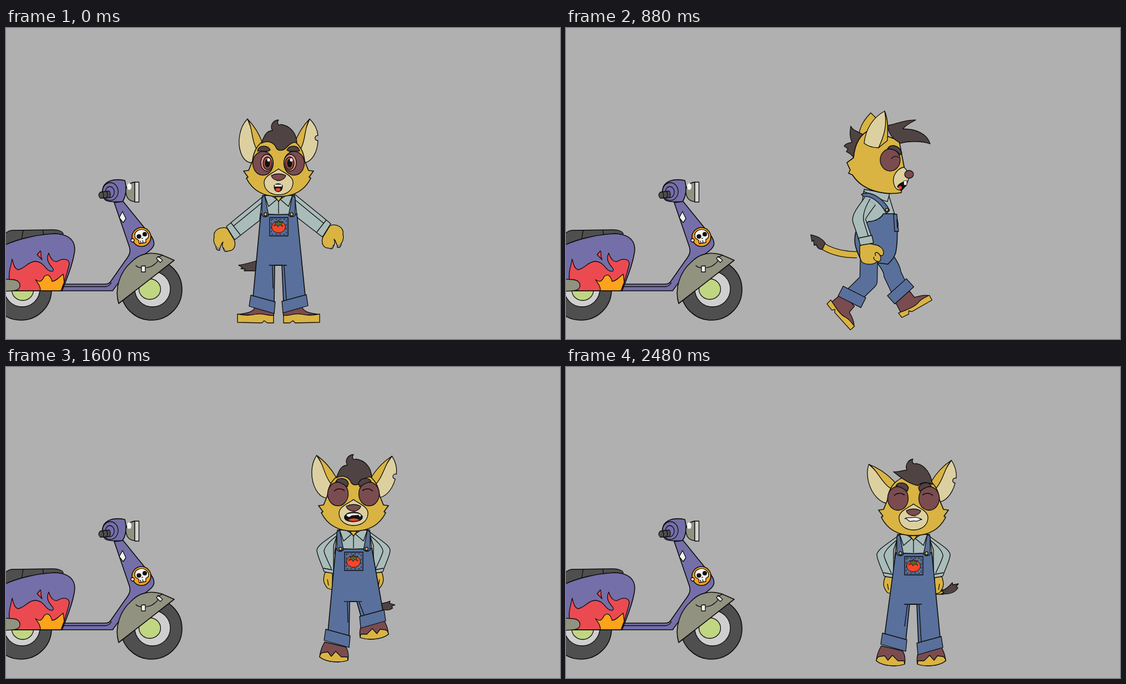
An HTML page for the animation above (2.6 s loop, 998 by 561 pixels).

```html
<!DOCTYPE html>
<html lang="en">
<head>
<meta charset="utf-8">
<title>Stomping off</title>
<style>
html, body { margin: 0; width: 100%; height: 100%; overflow: hidden; background: #b0b0b0; }
svg { display: block; width: 100%; height: 100%; }
</style>
</head>
<body>
<svg viewBox="0 0 998 561" stroke="#0d0d0d" stroke-width="1.3" stroke-linejoin="round">
  <g id="scooter"></g>
  <g id="hero"></g>
</svg>
<script>
const GOLD = '#d9b443', TAN = '#ddd0a0', HAIR = '#4f4343', BROWN = '#7a4c50', DENIM = '#58709b',
  SHIRT = '#a9bcba', RED = '#f5462a', RUBBER = '#4f4f4f', PURPLE = '#746fa8', OLIVE = '#929280', WHITE = '#f4f4f4', BLACK = '#111';

const P = (d, fill = 'none', w = 1.3) => `<path d="${d}" fill="${fill}" stroke-width="${w}"/>`;
const E = (x, y, rx, ry, fill, w = 1.3) => `<ellipse cx="${x}" cy="${y}" rx="${rx}" ry="${ry}" fill="${fill}" stroke-width="${w}"/>`;
const G = (transform, ...parts) => `<g transform="${transform}">${parts.join('')}</g>`;
const at = (x, y, ...parts) => G(`translate(${x} ${y})`, ...parts);
const turn = (a, x, y, ...parts) => G(`rotate(${a} ${x} ${y})`, ...parts);
const flip = (...parts) => G('scale(-1 1)', ...parts);
const both = art => art + flip(art);
const limb = (d, w, color) => P(d, 'none', w + 2.6) + `<path d="${d}" fill="none" stroke="${color}" stroke-width="${w}"/>`;

function scooter() {
  const wheel = (x, hubX, hubY) => E(x, 472, 55, 55, RUBBER, 1.6) + E(x + 2, 471, 32, 32, '#cfcfcf') + E(hubX, hubY, 19.5, 18.5, '#c0d683');
  return [
    wheel(27, 30, 473), wheel(262, 259, 471),
    P('M-3 373Q2 366 10 365L84 364C95 364 102 367 103 371L100 380L-3 400Z', RUBBER),
    P('M31 365L28 382M66 364L68 374'),
    P('M195 315L211 313L262 376C270 388 267 395 258 402L240 416C225 430 208 452 192 474H95V462H178C183 462 186 461 188 458L216 418C223 409 225 403 222 394Z', PURPLE, 1.6),
    P('M100 466.5H180C185 466 188 463 190 459'),
    P('M-3 392C22 380 60 372 88 371C116 372 127 386 123 407C118 435 108 455 101 474H-3Z', PURPLE, 1.6),
    P('M6 452C4 440 9 430 11 417C14 426 14 432 21 436C33 435 40 421 52 421C64 421 69 430 74 435C81 441 88 440 84 433C78 426 71 418 77 406C80 416 87 426 96 419C104 416 114 416 114 426C111 440 106 452 101 474H14Z', '#ec4a51'),
    P('M62 402L56 409L65 418C61 411 65 409 62 402Z', '#ec4a51'),
    P('M62 474C62 464 57 460 53 454C61 459 64 458 69 448C75 443 80 446 83 457C90 457 95 450 103 444C104 448 104 455 105 458L99 474Z', '#fda31c'),
    P('M-3 453L14 454C29 456 29 473 14 474L-3 475Z', OLIVE),
    P('M203 497C195 470 205 440 226 422C240 407 260 403 280 409L303 419Z', OLIVE, 1.6),
    P('M234 428C236 434 259 436 270 424C278 420 268 414 282 410'),
    P('M244 429.5L251 429L251 440L244 440Z', WHITE), P('M274 412L282 419L278 423L271 416Z', WHITE),
    P('M204 342L210 331L216 344L211 351Z', WHITE),
    E(244, 377, 17, 17, '#fda31c', 1.6), E(228, 383, 3, 3, WHITE),
    P('M233 379C228 366 243 360 252 366C260 372 257 380 252 381L252 387L240 389L239 383Z', WHITE),
    E(239.5, 376, 4.2, 4, BLACK, 0), E(250, 372, 4, 4, BLACK, 0), P('M244 380L247 379M242 384L243 388M246 383L247 387'),
    P('M176 285C184 273 198 272 214 275C218 289 216 304 210 313C200 314 188 314 180 311C172 305 172 294 176 285Z', PURPLE, 1.6),
    E(188, 295, 14, 16, PURPLE), E(187, 296, 8, 10, PURPLE),
    P('M170 296L186 294Q190 300 186 306L170 307Q164 301 170 296Z', RUBBER), P('M174 296Q178 301 174 307M181 295Q185 300 181 306'),
    P('M216 291C218 282 224 279 232 278V313C222 313 215 306 216 291Z', OLIVE),
    E(222, 286, 4, 6, WHITE, 0), P('M232 278H239.5V314H232Z', '#d4d4d4')
  ].join('');
}

const FACES = {
  calm: P('M-8 284Q-1 278 7 284Q7 295 -1 295Q-8 295 -8 284Z', BLACK) + P('M-7 282.5H6V286H-7Z', WHITE, 0) + E(-1, 291.5, 4.5, 2.7, RED, 0),
  shout: P('M-16 284C-12 277 -5 278 0 277C6 276 13 279 16 284C17 291 8 294 0 294C-8 294 -18 292 -16 284Z', BLACK) +
    P('M-13 281C-6 278 8 277 14 282L12 286L9 282L-3 283L-8 286L-12 284Z', WHITE, .5) + P('M-10 291Q0 285 11 291Q0 295 -10 291Z', RED, 0),
  grit: P('M-14 280C-8 277 -2 280 1 278C6 277 11 280 15 282C10 282 8 286 4 285C-2 283 -6 288 -9 284Z', WHITE) + P('M-16 281L-13 279')
};

function frontHead({ face, ears }) {
  const calm = face === 'calm';
  const strip = P('M-56 164C-46 180 -50 199 -40 218L-26 226L-28 210C-35 190 -46 174 -56 164Z', GOLD);
  const leftEar = P('M-56 164C-70 178 -75 205 -68 225C-64 236 -57 243 -48 243L-34 238L-36 215Z', TAN) + strip;
  const rightEar = P('M56 164C65 173 70 182 71 194C65 193 63 203 71 203C70 225 60 240 48 243L34 238L36 215Z', TAN) + flip(strip);
  const eye = E(-21, 243, 11, 15, '#d89e90') + E(-20, 244, 8, 11.5, '#95493c') + E(-20, 244, 4.6, 7.5, BLACK, 0);
  return [
    turn(ears[0], -42, 225, leftEar), turn(ears[1], 42, 225, rightEar),
    P('M0 196C-24 196 -44 210 -47 240L-54 257L-63 258L-55 269L-58 271C-46 295 -24 304 0 304C24 304 46 295 58 271L55 269L63 258L54 257L47 240C44 210 24 196 0 196Z', GOLD, 1.6),
    P(face === 'grit' ? 'M-36 189C-28 190 -20 186 -12 186C-16 175 -8 167 -1 166C-4 172 0 176 4 174C22 176 32 195 34 212C24 206 14 208 8 214C-4 212 -18 204 -36 189Z'
      : 'M-31 208C-26 196 -24 186 -11 185C-17 174 -8 166 0 166C-4 172 0 176 4 174C20 176 32 188 33 207C25 204 18 212 14 216C8 222 0 222 -4 217C-8 206 -20 202 -31 208Z', HAIR),
    at(0, calm ? 0 : -7,
      both(E(-28, 244, 18.5, 21.5, BROWN) + (calm ? eye : P('M-35 239Q-26 231 -16 238', 'none', 1.6)) +
        P(calm ? 'M-38 222C-36 211 -20 210 -15 220C-20 225 -28 221 -38 222Z' : 'M-32 222C-28 213 -13 214 -9 225L-11 231C-18 227 -24 222 -32 222Z', HAIR)),
      calm ? E(-18, 238, 2.5, 3, WHITE, 0) + E(23, 238, 2.5, 3, WHITE, 0) : '',
      P('M0 254C8 261 27 266 26 280C25 294 13 301 0 301C-13 301 -25 294 -26 280C-27 266 -8 261 0 254Z', TAN),
      P('M-13 266Q0 260 13 266Q12 272 3 275H-3Q-12 272 -13 266Z', BROWN), FACES[face])
  ].join('');
}

function front(p) {
  const calm = p.face === 'calm', b = p.body, h = p.head, crotch = 428 + b * .6, [[lx, ly], [rx, ry]] = p.feet;
  const spread = P('M-28 304C-50 322 -75 342 -94 358L-79 382L-30 344Z', SHIRT) + P('M-86 351L-69 373M-31 316L-81 357') +
    P('M-93 361C-105 358 -118 364 -116 377C-119 387 -112 398 -106 398C-103 392 -103 388 -100 386C-104 396 -96 405 -90 402C-80 402 -76 392 -80 382Z', GOLD) +
    P('M-113 393Q-113 402 -106 401L-106 397M-99 396Q-99 405 -92 403', '#8d8d8d');
  const akimbo = P(`M-27 ${304 + h - b}C-45 318 -64 328 -66 338C-66 348 -57 364 -53 377L-36 382V330Z`, SHIRT) +
    P('M-30 312C-42 322 -53 332 -53 341C-50 352 -44 362 -40 372M-54 371L-38 374') +
    P('M-51 378C-57 395 -52 400 -47 407L-38 410V380Z', GOLD) + P('M-47 391L-45 402');
  const cuff = P('M-56 480L-12 492L-14 513L-59 500Z', DENIM);
  const shoe = P('M-58 503L-20 512C-14 520 -15 530 -16 536C-30 541 -55 540 -67 530C-66 518 -62 510 -58 503Z', BROWN) +
    P('M-67 530C-66 524 -64 522 -60 522L-52 521L-46 529L-38 520L-28 530L-17 530L-16 536C-30 541 -55 540 -67 530Z', GOLD);
  const boot = P('M-42 503C-46 514 -60 514 -73 517L-9 519L-8 511Z', BROWN) +
    P('M-74 516C-60 519 -50 519 -40 516C-25 514 -15 521 -9 518V532H-20L-26 528L-30 532L-74 531Z', GOLD);
  const tail = calm ? P('M-40 420C-50 423 -60 426 -72 428L-65 432L-68 434L-60 435L-62 438L-40 438Z', HAIR)
    : at(-p.tail / 3, p.tail, turn(p.tail, 62, 402, P('M38 400L54 402V410L38 410Z', GOLD) +
      P('M50 404C58 402 64 396 70 389L71 393L81 391L77 396L80 398C76 406 66 411 50 409L55 407Z', HAIR)));
  return at(p.x, 0,
    calm ? boot + flip(boot) : '', tail,
    at(0, b, calm ? spread + at(0, -5, flip(spread)) : both(akimbo)), P(`M-29 ${302 + h}H29L34 ${345 + b}H-34Z`, SHIRT),
    calm ? '' : at(lx, ly, shoe) + at(rx - 9, ry, flip(shoe)),
    P(`M-32 ${b + 335}L${lx - 52} ${ly + 484}L${lx - 14} ${ly + 495}L-7 ${crotch}H6L${rx + 9} ${ry + 500}L${rx + 48} ${ry + 488}L33 ${b + 335}Q0 ${b + 338} -32 ${b + 335}Z`, DENIM, 1.6),
    P(`M-17 ${crotch}H15M-11 ${crotch + 1}L${lx - 16} ${ly + 468}M10 ${crotch + 1}L${rx + 14} ${ry + 495}`),
    at(lx, ly, cuff), at(rx - 6, ry + 6, flip(cuff)),
    P(`M0 ${309 + h}V${335 + b}`),
    both(at(0, h, P('M-25 302L-18 322L-3 309L-14 302Z', SHIRT)) +
      P(`M-30 ${306 + h}L-25 ${302 + h}L-18 ${338 + b}Q-24 ${343 + b} -30 ${338 + b}Z`, DENIM) + E(-23.5, 336 + b, 2.8, 2.8, '#c8ad62')),
    at(0, h, P('M-7 304H7L0 313Z', GOLD)),
    at(0, b,
      P('M-16 342H17V375H-16Z', DENIM), '<g stroke-dasharray="4 3">' + P('M-13 345H14V372H-13Z', 'none', .9) + '</g>',
      E(0, 359, 12.5, 10.5, RED, 1), P('M-7 349L-2 351L0 346L2 351L8 349L5 354L8 358L2 355L-1 359L-3 355L-9 357L-5 353Z', '#4b7030', .8)),
    at(0, h, frontHead(p)));
}

// hip, knee, ankle, foot angle, cuff angle
function leg([hx, hy, kx, ky, ax, ay, foot, cuff], left) {
  const reach = Math.hypot(kx - ax, ky - ay) / 10;
  const cx = ax + (kx - ax) / reach, cy = ay + (ky - ay) / reach;
  const shoe = P('M-17 -2H15L17 12C30 15 38 18 41 23V28H-18Z', BROWN) +
    P('M-22 22C-8 24 8 28 20 23C28 20 34 22 42 22V32H0L-4 28L-7 33L-21 32Z', GOLD);
  return G(`translate(${ax} ${ay}) rotate(${foot})`, left ? flip(shoe) : shoe) +
    limb(`M${hx} ${hy}Q${kx} ${ky - 12} ${kx} ${ky}L${cx} ${cy}`, 30, DENIM) +
    G(`translate(${cx} ${cy}) rotate(${cuff})`, P('M-23 -10H23V10H-23Z', DENIM));
}

const GRIP = P('M0 3C5 -3 20 -3 26 0C35 0 43 7 43 14C43 20 39 21 36 18C40 24 38 32 32 30C24 38 10 35 5 32C-2 25 1 14 0 3Z', GOLD) + P('M36 18C30 10 26 15 29 20M32 30C26 28 24 24 26 22');

const leanBack = p => at(p.x, p.y,
  limb('M463 430C452 447 432 455 415 457', 10, GOLD),
  P('M428 450L402 451L386 455L395 459L390 463L400 462L396 467C410 468 422 462 428 450Z', HAIR),
  leg(p.legs[0]),
  P('M452 314C480 302 500 305 510 322L517 340L460 368Z', SHIRT),
  P('M454 362C470 366 488 362 492 350C498 340 510 338 518 334C530 350 538 385 536 405C534 418 527 422 522 427L472 430C460 405 454 385 454 362Z', DENIM, 1.6),
  leg(p.legs[1]),
  P('M514 336L519 334L529 364L523 366Z', DENIM), P('M519 341C525 345 526 353 526 359Z', RED),
  limb('M468 326L434 356L450 392', 24, SHIRT), P('M462 318C445 335 434 348 433 355L441 388'),
  P('M470 310L497 304L495 319L478 316Z', SHIRT),
  P('M447 318C452 308 490 314 504 334L497 341C485 326 465 316 450 322Z', DENIM), E(499, 334, 2.8, 2.8, '#c8ad62'),
  at(441, 397, GRIP), P('M436 391L460 386L463 401L439 406Z', SHIRT),
  turn(p.tilt, 455, 308,
    P('M405 180L424 188L410 205Z', GOLD), P('M378 238L390 236L388 230L406 228V264L392 262L396 254L388 251L390 244Z', HAIR),
    P('M396 288L405 284C403 250 402 225 415 200C440 190 465 195 480 208L506 247L518 283C505 300 490 308 465 311C440 312 420 305 405 296L412 295Z', GOLD, 1.6),
    P('M415 188C425 182 437 190 443 184C444 179 441 175 437 175C452 170 459 179 462 189C466 178 476 174 485 183L493 194L485 193L480 208C465 211 452 209 440 212Z', HAIR),
    P('M392 183C386 205 392 232 415 244L433 242L438 233C430 212 412 193 392 183Z', TAN), P('M392 183C415 193 437 210 438 232L434 238C428 212 412 196 392 183Z', GOLD),
    E(472, 243, 17.5, 20.5, BROWN), P('M471 238Q477 231 483 236'), P('M458 226C461 214 476 212 485 221V227C474 222 466 222 458 226Z', HAIR),
    P('M506 247C492 252 487 264 493 275C498 284 507 286 518 283L512 274L518 260Z', TAN), P('M505 268C510 263 515 264 518 263L515 278L506 280Q502 274 505 268Z', BLACK),
    P('M512 265L517 263V271L511 272Z', WHITE, .6), E(508, 276, 4, 3, RED, 0), E(514, 253, 7.5, 6.5, BROWN)));

const leanForward = p => at(p.x, p.y,
  limb('M524 409C500 409 480 405 462 393', 10, GOLD),
  P('M467 388C460 378 452 376 441 373L443 385L446 383L447 392L451 391C453 398 458 400 462 399Z', HAIR),
  leg(p.legs[0]),
  P('M536 295L582 304L592 336L550 362L530 345Z', SHIRT),
  P('M545 349C558 349 568 342 572 335H592C598 350 598 385 594 405C590 418 585 420 580 426L532 420C520 395 518 385 522 368Z', DENIM, 1.6),
  leg(p.legs[1]),
  P('M590 336H596L599 367H592Z', DENIM), P('M596 345Q600 352 597 360Z', RED),
  limb('M548 312C535 330 527 340 528 347L540 382', 22, SHIRT), P('M548 308C536 328 534 342 537 351L545 377'),
  P('M537 291L583 299L579 313C565 310 550 300 537 295Z', SHIRT),
  P('M532 300C548 292 573 308 583 329L577 335C568 317 552 302 536 304Z', DENIM), E(578, 328, 2.8, 2.8, '#c8ad62'),
  at(529, 391, GRIP), P('M527 379L551 374L554 388L530 392Z', SHIRT),
  turn(p.tilt, 550, 295,
    P('M549 153L558 162L545 190L527 195C530 175 538 165 549 153Z', GOLD),
    P('M513 177C516 184 524 186 535 192L518 233L512 227L505 223L508 218L501 213C505 206 512 208 515 206C510 195 512 185 513 177Z', HAIR),
    P('M506 243L518 234C520 210 530 190 548 184L600 203L609 250L604 297C575 302 535 295 516 265L509 262L512 256Z', GOLD, 1.6),
    P('M579 176C592 174 612 165 630 166C618 172 610 178 607 182C630 182 650 190 656 209C640 203 615 204 603 208C592 202 582 195 579 176Z', HAIR),
    P('M574 150C555 160 540 180 537 208C545 214 555 216 563 216L579 200C580 180 580 165 574 150Z', TAN), P('M574 150C579 175 573 195 563 216L579 203C580 180 580 165 574 150Z', GOLD),
    E(584, 238, 18, 20, BROWN), P('M586 236Q593 228 600 234'), P('M579 218C585 208 600 211 605 225L602 229C595 220 588 218 579 218Z', HAIR),
    P('M609 251C598 253 588 265 590 278C592 290 598 294 605 292L613 284L620 264Z', TAN),
    P('M597 286C601 279 608 278 614 276L612 284L604 293Z', BLACK), P('M608 276L614 275V283L609 284Z', WHITE, .8), E(602, 288, 3, 3, RED, 0), E(618, 264, 8, 7, BROWN)));

const back = p => at(p.x, p.y,
  leg(p.legs[1], true), leg(p.legs[0], true),
  limb('M556 318C535 328 516 334 517 342L524 382', 26, SHIRT), limb('M608 318L625 352L603 394', 23, SHIRT),
  P('M545 330L530 345L535 374'), P('M510 374L538 369V384L513 388Z', SHIRT), P('M598 378L619 391L612 403L590 390Z', SHIRT),
  P('M550 302H607L608 355H541Z', SHIRT),
  P('M543 352L551 306L567 308V345L602 349L598 312L608 311L605 355C600 375 600 395 592 422C575 432 550 428 540 410C535 390 537 365 543 352Z', DENIM),
  P('M514 388L538 383C545 390 548 394 555 399L549 403L553 408C545 418 530 418 517 411C512 404 513 396 514 388Z', GOLD),
  P('M592 393L612 403C612 412 608 422 600 424C590 427 575 424 571 414L575 410L570 402Q580 397 592 393Z', GOLD),
  limb('M580 418C585 440 595 455 611 464', 9, GOLD),
  P('M607 458C615 457 625 462 636 466L627 468L631 472L622 472L624 478C612 476 604 470 607 458Z', HAIR),
  turn(p.tilt, 587, 306,
    P('M525 154C514 165 512 175 516 181C522 184 520 193 513 196C515 215 525 235 537 238L558 200C548 175 538 165 525 154Z', GOLD),
    P('M635 171C625 182 618 190 612 200L634 250C650 235 655 220 653 205C650 188 642 178 635 171Z', GOLD),
    P('M537 238L530 250L520 252L528 264L524 264C535 290 560 306 587 306C612 306 632 292 639 279L646 267L637 266C634 240 638 205 618 200C595 192 570 190 557 200Z', GOLD, 1.6),
    P('M577 166L589 176C600 174 609 184 610 203L623 209L615 215L616 228L611 240C600 248 588 248 574 246C584 225 580 210 559 198C565 180 580 182 577 166Z', HAIR)));

const STAND = [[498, 418, 502, 460, 498, 502, 0, 0], [485, 418, 488, 460, 478, 504, 0, 0]];
const CREEP = [[495, 425, 484, 455, 477, 497, 10, 10], [500, 412, 513, 456, 462, 470, 32, 41]];
const PASS = [[562, 412, 562, 455, 560, 502, 0, 0], [550, 412, 578, 448, 545, 480, 26, 26]];
const STRIDE = [[568, 408, 588, 444, 607, 484, -30, -42], [546, 414, 545, 456, 508, 492, 48, 27]];
const RISE = [[556, 410, 503, 434, 536, 476, -38, -24], [590, 420, 596, 460, 600, 504, -1, -8]];
const PLANT = [[558, 412, 548, 455, 545, 504, 0, 4], [588, 420, 612, 452, 604, 488, -16, -12]];

const FLAT = [[0, 0], [0, 0]], RIGHT_UP = [[6, -7], [5, -48]], LEFT_UP = [[4, -38], [0, 0]];
const idle = (head, body, ears = 0) => front({ x: 491, head, body, ears: [-ears, ears], face: 'calm', feet: [[6, 2], [0, -5]] });
const mad = (x, head, body, left, right, face, feet = FLAT, tail = 0) => front({ x, head, body, ears: [left, right], face, feet, tail });
const side = (draw, x, y, tilt, legs) => draw({ x, y, tilt, legs });

const STEPS = [
  [0, idle(0, 0)], [40, idle(2, 1, 5)], [80, idle(7, 5, 14)], [120, idle(9, 6, 18)], [160, idle(-6, -3)],
  [240, mad(491, -12, -4, -4, 4, 'grit')], [320, side(leanBack, 0, 0, 0, STAND)],
  [480, side(leanBack, 0, -2, -3, STAND)], [560, side(leanBack, 0, 0, 0, CREEP)], [640, side(leanBack, 20, -6, 10, CREEP)],
  [720, side(leanForward, -58, 2, -4, PASS)], [800, side(leanForward, -28, -8, -2, PASS)],
  [880, side(leanForward, 0, 0, 0, STRIDE)], [960, side(leanForward, 14, 3, 2, PASS)],
  [1040, side(back, -10, 6, 3, PLANT)], [1120, side(back, -5, -2, 1, PLANT)], [1200, side(back, 0, 0, 0, RISE)],
  [1280, side(back, 14, -4, -2, RISE)], [1360, side(back, 28, 4, 2, PLANT)],
  [1440, mad(622, 8, 8, -40, 36, 'grit')], [1520, mad(626, 12, 12, -48, 44, 'grit')], [1560, mad(626, 0, 0, -25, 22, 'grit', [[3, -3], [3, -22]])],
  [1600, mad(626, -8, -8, -10, 13, 'shout', RIGHT_UP, 28)], [1680, mad(626, -24, -16, 4, -4, 'shout', RIGHT_UP, 12)],
  [1760, mad(626, 13, 16, -65, 64, 'grit')], [1840, mad(626, -8, -7, -12, 14, 'shout', LEFT_UP, 24)],
  [1920, mad(626, 12, 17, -46, 41, 'grit', [[4, -21], [0, 0]])], [2000, mad(626, 14, 16, -65, 64, 'grit')],
  [2080, mad(626, -8, -8, -10, 13, 'shout', RIGHT_UP, 24)], [2160, mad(626, -12, -9, -4, 5, 'shout', RIGHT_UP, 12)],
  [2240, mad(626, 12, 14, -62, 60, 'grit')], [2320, mad(626, 5, 6, -42, 34, 'grit')],
  [2400, mad(626, -2, -1, -18, 8, 'grit')], [2480, mad(626, 0, 0, -25, 12, 'grit')]
];

document.getElementById('scooter').innerHTML = scooter();
const hero = document.getElementById('hero');
let shown;
function tick() {
  const time = performance.now() % 2600;
  const step = STEPS.findLast(([start]) => start <= time);
  if (step !== shown) hero.innerHTML = (shown = step)[1];
  requestAnimationFrame(tick);
}
tick();
</script>
</body>
</html>
```
